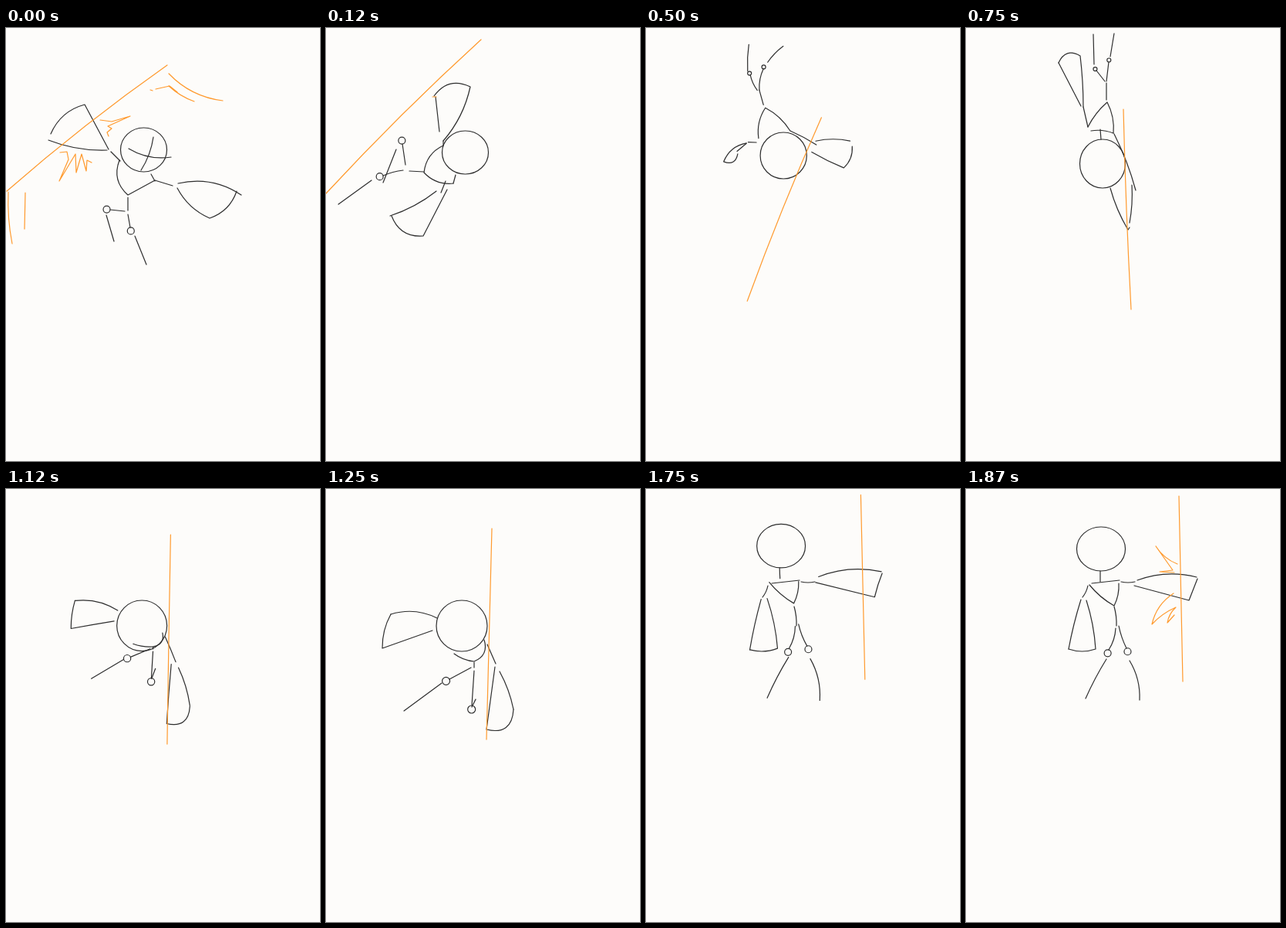
An HTML page with a canvas that plays this animation: 407x560 px, repeating every 2.12 s.

```html
<!DOCTYPE html>
<html lang="en">
<head>
<meta charset="utf-8">
<title>Wall jump sketch</title>
<style>
html, body { margin: 0; width: 100%; height: 100%; overflow: hidden; background: #fdfcfa; }
canvas { display: block; width: 407px; height: 560px; }
</style>
</head>
<body>
<canvas id="stage"></canvas>
<script>
const W = 407, H = 560, LOOP = 2120;
const INK = '#2e2e2e', ORANGE = '#ff9a2e', PAPER = '#fdfcfa';

// A limb is a chain of joints "x,y"; "x,y/b" arrives on an arc bowed b px to the
// left of travel, and ";" lifts the pen. Heads are "centre radii".
const hang = pose({
  head: '178.5,157.5 30,28.5', knee: 4.5,
  neck: '188,189 193,198', chest: '147,171 158,216/-8 193,197', spine: '158,219 158,236',
  upperL: '148,172 136,160', armL: '133,157 102,99 58,137/-7;55,145 131,158/-4',
  upperR: '193,197 216,204', armR: '222,207 264,246/-5 299,211/-6;305,216 223,201/-9',
  legL: '154,237 135,235;130,242 140,276', legR: '158,241 161,258;167,269 182,306',
  face: '159,156 214,167/-5;191,141 175,184/2.5',
  wall: '1,211 209,48/3.5',
  marks: '3,212 8,279/-2;25,213 24,260;211,59 281,94/-7;187,80 190,81;194,79 212,75 222,83;211,75 244,95/-2;' +
    '122,119 137,121 161,114 132,127 137,130 131,135 133,140;' +
    '70,161 79,160 81,170 69,198 90,163 91,187 98,163 104,185 105,171 111,174'
});

const tilt = pose({
  head: '180.5,161 30,28', knee: 4.5,
  neck: '168,190 165,201', chest: '152,152 127,187/-6 165,201/-5', spine: '127,186 108,185',
  upperL: '152,152 152,146', armL: '152,146 187,76/-5 140,88/-10;142,89 147,134',
  upperR: '155,198 149,213', armR: '157,209 126,269 85,243/9;83,243 143,211/-3',
  legL: '103,177 99,150;91,157 74,200', legR: '100,184 74,191/-1;59,197 16,228',
  wall: '0,214 201,15/3',
  marks: '138,89 143,89'
});

const dive = pose({
  head: '179,158 30.5,29', knee: 2.5,
  chest: '188,129 144,113/-3 147,153/-5', spine: '140,109 132,92',
  upperL: '188,129 204,117', armL: '217,122 258,118 263,71/-6;258,64 206,111/-3',
  upperR: '145,163 142,178', armR: '139,181 133,265/-8 168,224/-5;165,219 141,181',
  legL: '133,93 138,61/3;145,49 178,24/2', legR: '130,94 118,69/2;115,65 119,29/1.5',
  wall: '76,346 243,123/3',
  marks: '12,303 75,331/-1;45,301 74,311/-5;69,301 83,299/-2;84,294 94,293/-3;' +
    '120,227 97,186/-5 117,189 123,191 124,185;' +
    '118,268 68,259/-3 105,247 100,235 116,251 109,245 116,234;165,213 166,195 168,199;164,200 166,195'
});

const handstand = pose({
  head: '177,175.5 29.5,31.5', knee: 2.5,
  neck: '175,144 174,131', yoke: '162,133 191,136/2',
  chest: '191,136 183,96/-3 158,128/-2', spine: '182,93 182,71',
  upperL: '192,137 220,210/2', armL: '187,207 210,261/-2 212,258;212,252 215,203/-1.5',
  upperR: '158,128 152,102', armR: '152,102 148,36/-1 120,45/-8;120,45 149,101',
  legL: '182,69 185,44;187,37 192,7', legR: '180,69 169,55;166,47 165,8',
  wall: '214,364 204,105/1'
});

const crouch = pose({
  head: '176,177 33,33', knee: 5,
  chest: '205,195 192,223/7 166,213/2', spine: '192,224 192,231',
  upperL: '209,201 220,226', armL: '219,230 208,311 243,285/-13;243,285 225,236/-2',
  armR: '138,183 73,206 84,162/3;84,162 144,167/6',
  legL: '192,235 189,280;189,282 194,272', legR: '188,231 160,246;150,251 101,287',
  wall: '208,324 215,51'
});

const coil = pose({
  head: '172.5,173.5 33.5,33.5', knee: 5,
  neck: '194,202 181,226/2', chest: '203,184 202,229/5 166,209/4',
  armL: '173,230 106,250 147,290/-15;147,290 180,231/-1',
  armR: '130,204 106,229 95,184/5;95,183 144,154/4',
  legL: '205,232 188,279/3;188,281 219,260', legR: '209,241 177,245/2;114,280 103,289',
  wall: '211,320 216,43'
});

const punch = pose({
  head: '175,77.5 31.5,28.5', knee: 4.5,
  neck: '174,106 174,120', yoke: '163,122 199,118',
  chest: '198,122 192,151/2 160,124/2', spine: '192,152 195,177/1',
  upperL: '201,120 219,120/-1', armL: '218,125 289,144 300,116;299,114 222,118/-6',
  upperR: '158,125 151,140/1', armR: '156,144 168,207/2 133,207/3;133,207 149,143/1',
  legL: '198,177 208,206/-1;212,222 225,273/4', legR: '194,180 185,208/2;182,220 155,271/-1',
  wall: '281,249 276,9',
  marks: '274,97 246,74/3 268,105 251,107 270,108;269,135 241,175/-5 272,153/2 261,173/-2 270,163'
});

function parse(text) {
  return text.split(';').map(s => s.split(' ').map(j => [...j.split(/[,/]/).map(Number), 0].slice(0, 3)));
}

function pose({ head, knee, ...limbs }) {
  for (const name in limbs) limbs[name] = parse(limbs[name]);
  return { head: head.split(/[ ,]/).map(Number), knee, limbs };
}

function lerp(a, b, t) {
  return Array.isArray(a) ? a.map((v, i) => lerp(v, b[i], t)) : a + (b - a) * t;
}

function spin(limb, [cx, cy], angle) {
  const c = Math.cos(angle), s = Math.sin(angle);
  return limb.map(line => line.map(([x, y, bow]) =>
    [cx + (x - cx) * c - (y - cy) * s, cy + (x - cx) * s + (y - cy) * c, bow]));
}

// In-between pose; the body also turns about the head
function mix(a, b, t, degrees = 0) {
  const turn = degrees * Math.PI / 180, limbs = {};
  const near = t < 0.5 ? a.limbs : b.limbs;
  for (const name of Object.keys({ ...a.limbs, ...b.limbs })) {
    const from = a.limbs[name], to = b.limbs[name];
    const angle = name === 'wall' ? 0 : turn;
    if (name === 'marks') continue;
    if (from && to) limbs[name] = lerp(spin(from, a.head, angle * t), spin(to, b.head, angle * (t - 1)), t);
    else if (near[name]) limbs[name] = near[name];
  }
  return { head: lerp(a.head, b.head, t), knee: lerp(a.knee, b.knee, t), limbs };
}

const timeline = [
  [0, hang], [120, tilt], [250, mix(tilt, dive, 0.5, 75)], [370, dive],
  [500, mix(dive, handstand, 0.4, 40)], [620, mix(dive, handstand, 0.85, 40)], [750, handstand],
  [1120, mix(handstand, crouch, 0.85)], [1250, crouch], [1370, mix(crouch, coil, 0.5)], [1500, coil],
  [1620, mix(coil, punch, -0.08)], [1750, mix(coil, punch, 1.04)], [1870, punch]
];

const canvas = document.getElementById('stage');
const ctx = canvas.getContext('2d');
const scale = window.devicePixelRatio || 1;
canvas.width = W * scale;
canvas.height = H * scale;
ctx.scale(scale, scale);
ctx.lineCap = ctx.lineJoin = 'round';
ctx.lineWidth = 1.2;

function ring(x, y, rx, ry) {
  ctx.beginPath();
  ctx.ellipse(x, y, rx, ry, 0, 0, Math.PI * 2);
  ctx.stroke();
}

function stroke(line) {
  let [x, y] = line[0];
  ctx.beginPath();
  ctx.moveTo(x, y);
  for (const [nx, ny, bow] of line.slice(1)) {
    const dx = nx - x, dy = ny - y, k = 2 * bow / (Math.hypot(dx, dy) || 1);
    ctx.quadraticCurveTo(x + dx / 2 + dy * k, y + dy / 2 - dx * k, nx, ny);
    [x, y] = [nx, ny];
  }
  ctx.stroke();
}

// The knee sits just past the end of the thigh
function drawKnee([[[hx, hy], [x, y]]], r) {
  const k = r / Math.hypot(x - hx, y - hy);
  ring(x + (x - hx) * k, y + (y - hy) * k, r, r);
}

function draw({ head, knee, limbs }) {
  ctx.fillStyle = PAPER;
  ctx.fillRect(0, 0, W, H);
  ctx.strokeStyle = INK;
  ring(...head);
  drawKnee(limbs.legL, knee);
  drawKnee(limbs.legR, knee);
  for (const name in limbs) {
    ctx.strokeStyle = name === 'wall' || name === 'marks' ? ORANGE : INK;
    limbs[name].forEach(stroke);
  }
}

const start = performance.now();
function tick() {
  const time = Math.max(0, performance.now() - start) % LOOP;
  draw(timeline.filter(([at]) => at <= time).pop()[1]);
  requestAnimationFrame(tick);
}
tick();
</script>
</body>
</html>
```
